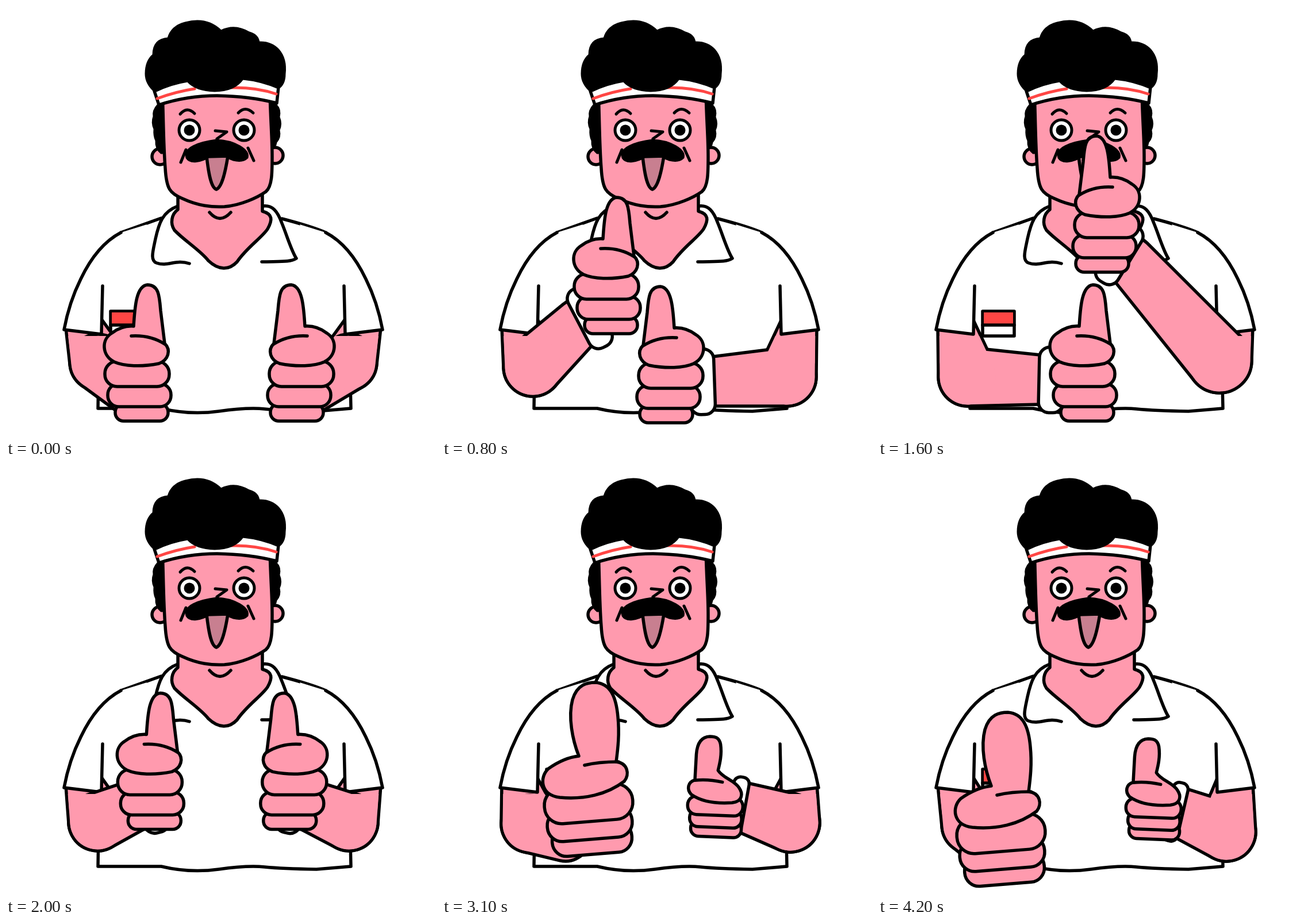
These frames come from a looping animation (748x748 px, 4300 ms). An HTML page with a canvas:

```html
<!DOCTYPE html>
<html lang="en">
<head>
<meta charset="utf-8">
<title>Thumbs up</title>
<style>
html, body { margin: 0; width: 100%; height: 100%; overflow: hidden; background: #fff; }
canvas { display: block; width: 748px; height: 748px; }
</style>
</head>
<body>
<canvas id="stage" width="748" height="748"></canvas>
<script>
const ctx = document.getElementById('stage').getContext('2d');
const SKIN = '#ff9aae', RED = '#ff4644', INK = '#000', WHITE = '#fff', MOUTH = '#c87f90';
const STEP = 100, STEPS = 43, LINE = 5.5, MIRROR = 756;

function shape(d, fill, line, width = LINE) {
  const path = typeof d === 'string' ? new Path2D(d) : d;
  if (fill) { ctx.fillStyle = fill; ctx.fill(path); }
  if (line) { ctx.strokeStyle = line; ctx.lineWidth = width; ctx.stroke(path); }
}
function disc(x, y, r, fill, line, width) {
  const p = new Path2D();
  p.arc(x, y, r, 0, Math.PI * 2);
  shape(p, fill, line, width);
}

// Hands are drawn with the thumb tip at 0,0. Fingers: centre x, centre y, width, height.
const HANDS = {
  side: {
    fist: 'M-24 72C-22 45 -21 2 0 0C20 0 21 20 23 45L30 102C42 114 36 131 20 137C-10 143 -40 142 -58 134C-80 122 -80 95 -62 84C-50 75 -38 71 -24 72Z',
    crease: 'M-28 89Q5 87 30 103',
    fingers: [[-18, 155, 112, 44], [-14, 192, 110, 40], [-10, 222, 92, 30]], tilt: 0
  },
  near: {
    fist: 'M-29 128C-40 100 -48 60 -40 30C-32 3 -14 0 0 0C26 2 36 25 39 60C42 90 39 115 36 138C56 140 60 160 50 172C20 195 -20 204 -62 200C-96 196 -98 165 -82 150C-65 138 -48 130 -29 128Z',
    crease: 'M-19 144Q5 138 40 138',
    fingers: [[-12, 211, 154, 62], [-10, 246, 148, 54], [-6, 273, 139, 52]], tilt: -0.08
  },
  front: {
    fist: 'M-23 95C-28 75 -34 50 -30 22C-26 2 -14 0 0 0C26 1 36 22 38 50L42 122C62 128 66 148 52 163C25 182 -15 189 -62 186C-94 182 -92 158 -82 144C-68 122 -38 118 -23 95Z',
    crease: 'M-35 128Q5 119 43 123',
    fingers: [[-15, 195, 155, 52], [-16, 230, 146, 50], [-17, 259, 142, 46]], tilt: -0.04
  }
};

// hand, tip x, tip y, scale, elbow x, elbow y, elbow radius, wrist x, wrist y
const POSES = {
  low:   ['side', 246, 485, 1, 160, 620, 49, 218, 670],
  mid:   ['side', 304, 333, 1, 158, 628, 51, 238, 552],
  high:  ['side', 376, 226, 1, 162, 617, 56, 318, 443],
  cross: ['side', 374, 485, 1, 156, 645, 51, 280, 650],
  pair:  ['side', 275, 327, 1, 157, 630, 54, 214, 540],
  big:   ['near', 267, 380, 1, 153, 626, 50, 215, 648],
  big2:  ['near', 226, 432, 1, 160, 628, 49, 215, 680],
  small: ['front', 290, 474, 0.62, 150, 624, 51, 229, 598],
  rest:  ['front', 286, 478, 0.62, 150, 640, 51, 226, 608],
  raise: ['front', 128, 30, 1, 145, 523, 68, 122, 355]
};

// step, pose, shift x, shift y
const LEFT = [
  [0, 'low'], [3, 'pair', 0, -77], [6, 'low', 0, 10], [8, 'mid'], [10, 'high', -4, -43],
  [14, 'cross', 0, 20], [16, 'cross'], [19, 'low', 20, 0], [22, 'pair', 0, -176], [24, 'pair'],
  [26, 'low'], [29, 'pair', 0, -180], [31, 'big'], [34, 'small'], [36, 'pair', -40, -76],
  [38, 'raise'], [39, 'raise'], [42, 'big2'], [43, 'low']
];
const RIGHT = [
  [0, 'low', 14, 0], [3, 'pair', 15, -77], [6, 'low', 14, 10], [8, 'cross', 2, 3], [10, 'cross', 2, 20],
  [14, 'high', 0, -55], [16, 'high'], [19, 'low', 20, 0], [22, 'pair', 15, -176], [24, 'pair', 15, -1],
  [26, 'low', 14, 0], [29, 'pair', 15, -180], [31, 'small'], [34, 'big'], [36, 'pair', -30, -76],
  [38, 'raise', 10, 5], [39, 'raise', 10, 5], [42, 'rest'], [43, 'low', 14, 0]
];

function resolve([, name, dx = 0, dy = 0]) {
  const p = POSES[name].slice();
  p[1] += dx; p[7] += dx;
  p[2] += dy; p[8] += dy;
  return p;
}
function poseAt(track, step) {
  let i = 0;
  while (i < track.length - 2 && track[i + 1][0] <= step) i++;
  const a = resolve(track[i]), b = resolve(track[i + 1]);
  const u = (step - track[i][0]) / (track[i + 1][0] - track[i][0]);
  const k = u * u * (3 - 2 * u);
  const [x, y, s, ex, ey, er, wx, wy] = a.slice(1).map((v, n) => v + (b[n + 1] - v) * k);
  const up = ey < 580;
  return { hand: u < 0.5 ? a[0] : b[0], x, y, s, ex, ey, er, wx, wy, up, wr: up ? 46 : 43 };
}

// Tapered capsule between two circles
function limb(x1, y1, r1, x2, y2, r2) {
  const dx = x2 - x1, dy = y2 - y1, a = Math.atan2(dy, dx);
  const b = Math.acos(Math.max(-1, Math.min(1, (r1 - r2) / Math.hypot(dx, dy))));
  const p = new Path2D();
  p.arc(x1, y1, r1, a + b, a - b + Math.PI * 2);
  p.arc(x2, y2, r2, a - b, a + b);
  p.closePath();
  return p;
}

function drawHand({ hand, x, y, s }) {
  const h = HANDS[hand], width = LINE / s;
  ctx.save();
  ctx.translate(x, y);
  ctx.scale(s, s);
  for (const [cx, cy, w, t] of [...h.fingers].reverse()) {
    ctx.save();
    ctx.translate(cx, cy);
    ctx.rotate(h.tilt);
    const p = new Path2D();
    p.roundRect(-w / 2, -t / 2, w, t, t * 0.48);
    shape(p, SKIN, INK, width);
    ctx.restore();
  }
  shape(h.fist, SKIN, INK, width);
  shape(h.crease, null, INK, width);
  ctx.restore();
}

function drawBand({ wx, wy, ex, ey, wr, s, up }) {
  const half = wr + 14 * s, p = new Path2D();
  ctx.save();
  ctx.translate(wx, wy);
  // The band leans less than the forearm, following the upright hand
  ctx.rotate(up ? -Math.PI / 2 : Math.atan2((wy - ey) * 0.55, wx - ex));
  p.roundRect(0, -half, 43 * s, half * 2, 18 * s);
  shape(p, WHITE, INK);
  ctx.restore();
}

function drawArm(p) {
  const fore = limb(p.ex, p.ey, p.er, p.wx, p.wy, p.wr);
  if (!p.up) {
    shape(limb(136, 558, 32, p.ex, p.ey, p.er), SKIN, INK);
    shape('M245 380L200 394Q158 416 130 475Q110 515 101 563L166 571L168 487L215 440Z', WHITE);
    shape('M200 394Q158 416 130 475Q110 515 101 563L166 571L168 487', null, INK);
    shape(fore, SKIN, INK);
    ctx.save();
    ctx.beginPath();
    ctx.rect(0, 574, 748, 174);
    ctx.clip();
    shape(limb(136, 558, 29.5, p.ex, p.ey, p.er - 2.5), SKIN);
    ctx.restore();
  } else {
    shape(fore, SKIN, INK);
  }
  if (p.wy < p.ey + 12) drawBand(p);
  drawHand(p);
}

function drawBody(flag) {
  shape('M270 369L200 394Q150 480 162 570L160 700L270 700Q320 712 370 705T450 701T540 705L600 700L597 570Q606 480 556 394Q530 383 480 370', WHITE, INK);
  if (flag) {
    shape('M182 531H237V574H182Z', WHITE, INK);
    shape('M184 533H235V553H184Z', RED);
    shape('M182 555H237', null, INK);
  }
  // Collar and neck
  shape('M299 348C272 358 266 378 260 405C256 425 250 443 262 447C282 454 295 440 319 448L380 456L445 445C475 444 495 446 505 439C496 425 489 400 480 378C472 356 463 346 447 348Z', WHITE);
  shape('M299 348C272 358 266 378 260 405C256 425 250 443 262 447C282 454 295 440 319 448M445 445C475 444 495 446 505 439C496 425 489 400 480 378C472 356 463 346 447 348', null, INK);
  shape('M299 325V354C288 362 285 378 293 390C310 408 338 425 352 443C370 460 388 460 402 445C418 421 445 403 455 388C464 372 464 362 446 357V320', SKIN, INK);
  shape('M354 359Q372 380 391 359', null, INK);
}

function drawHead() {
  disc(268, 262, 14, SKIN, INK);
  disc(468, 260, 14, SKIN, INK);
  shape('M264 172Q255 182 257 192Q253 203 258 214Q257 226 261 234Q260 248 270 256L285 255V170Z', INK, INK, 3);
  shape('M450 168L470 172Q478 180 475 193Q480 205 475 216Q478 228 470 237Q469 246 460 248Z', INK, INK, 3);
  shape('M272 145C274 205 274 245 277 282C279 318 285 326 307 335C335 348 358 350 380 349C408 347 438 333 452 323C463 314 463 290 463 262C463 225 460 200 459 145Z', SKIN, INK);
  shape('M258 148L266 172Q315 156 367 156Q425 157 471 169L474 141Q365 95 258 148Z', WHITE, INK);
  shape('M263 161Q295 149 328 144M392 142Q435 141 470 153', null, RED, 5);
  shape('M259 149Q243 135 243 118Q243 96 256 85Q256 58 282 56Q288 35 312 29Q349 19 374 43Q398 31 423 46Q438 50 440 63Q461 62 474 76Q488 92 485 118Q485 136 474 143Q443 130 412 127Q397 148 363 148Q330 147 316 131Q285 136 259 149Z', INK, INK, 3);
  for (const x of [319, 414]) {
    disc(x, 216, 18, WHITE, INK, 5);
    disc(x, 216, 9.5, INK);
  }
  shape('M303 188Q315 174 328 187M404 186Q416 173 430 186', null, INK, 5);
  shape('M364 217L384 219L367 231', null, INK, 5);
  shape('M349 262C352 288 356 316 366 319C376 315 382 286 386 261Z', MOUTH, INK);
  shape('M314 264C308 247 335 237 366 233C397 234 424 250 420 264C410 274 392 269 380 260Q367 255 354 262C340 271 320 275 314 264Z', INK, INK, 3);
  shape('M313 250L304 272M421 247L431 269', null, INK, 5);
}

function draw(step) {
  const left = poseAt(LEFT, step), right = poseAt(RIGHT, step);
  ctx.fillStyle = WHITE;
  ctx.fillRect(0, 0, 748, 748);
  ctx.lineCap = ctx.lineJoin = 'round';
  drawBody(left.up || left.wy > left.ey - 20);
  drawHead();
  drawArm(left);
  ctx.save();
  ctx.translate(MIRROR, 0);
  ctx.scale(-1, 1);
  drawArm(right);
  ctx.restore();
}

const start = performance.now();
function tick() {
  draw(Math.floor((performance.now() - start) / STEP) % STEPS);
  requestAnimationFrame(tick);
}
tick();
</script>
</body>
</html>
```
